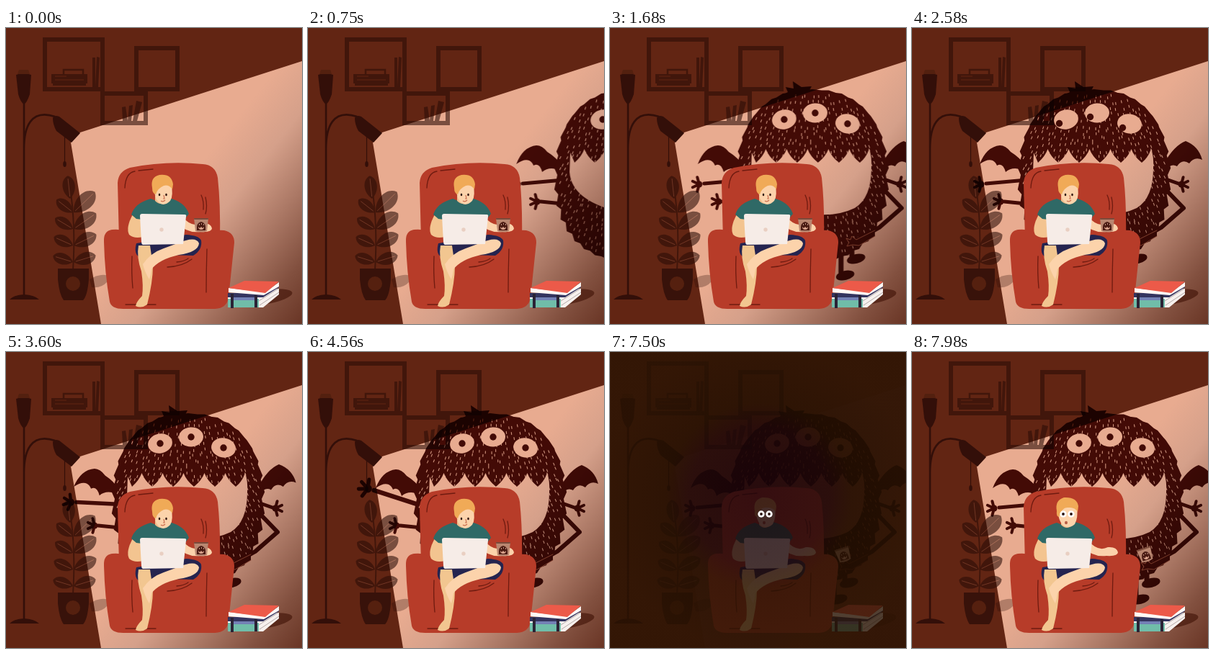
An HTML page that plays this animation: 411 by 411 pixels, repeating every 8000 ms.

```html
<!DOCTYPE html>
<html lang="en">
<head>
<meta charset="utf-8">
<title>Night visitor</title>
<style>
html, body { margin: 0; width: 100%; height: 100%; overflow: hidden; background: #622513; }
svg { display: block; width: 100vw; height: 100vh; }
#monster { mix-blend-mode: multiply; }
</style>
</head>
<body>
<svg viewBox="0 0 411 411" preserveAspectRatio="none">
  <defs>
    <linearGradient id="light" gradientUnits="userSpaceOnUse" x1="257" y1="205" x2="460" y2="366">
      <stop offset="0" stop-color="#e8ab90"/>
      <stop offset=".25" stop-color="#d5a08a"/>
      <stop offset=".5" stop-color="#ac7966"/>
      <stop offset=".75" stop-color="#82503f"/>
      <stop offset="1" stop-color="#643020"/>
    </linearGradient>
    <radialGradient id="gloom" gradientUnits="userSpaceOnUse" cx="207" cy="200" r="215">
      <stop offset="0" stop-color="#17030a"/>
      <stop offset=".45" stop-color="#1d0809"/>
      <stop offset=".6" stop-color="#211002"/>
      <stop offset="1" stop-color="#281303"/>
    </radialGradient>
    <g id="mugArt">
      <path d="M-10-9H10L8 9Q0 12-8 9Z" fill="#b98670"/>
      <path d="M-10-9H10L9.700-7H-9.700Z" fill="#7a4a3b"/>
      <path d="M-6 8Q-7-3 0-4Q7-3 6 8Z" fill="#4a1b13"/>
      <path d="M-4 3L-2 5L0 3L2 5L4 3Q4 7 0 7Q-4 7-4 3Z" fill="#dca48d"/>
      <path d="M-3 0h1M0-1h1M3 0h1" stroke="#e8bba6" stroke-width="1.500"/>
    </g>
  </defs>

  <rect width="411" height="411" fill="#622513"/>
  <path id="beam" d="M103 145L411 46V411H132L90 159Z" fill="url(#light)"/>

  <g opacity=".58" fill="#2a0c06" stroke="#2a0c06" stroke-width="0">
    <path d="M54 16h80v69h-80zM181 28h57v57h-57zM134 91h60v41h-60z" fill="none" stroke-width="6"/>
    <path d="M63 64h50v13h-50zM65 77h46v3h-46z"/>
    <path d="M80 64V58H107V64" fill="none" stroke-width="2.500"/>
    <path d="M68 67h16M68 72h40" stroke="#622513" stroke-width="1"/>
    <path d="M120 41h4v41h-4zM126 40l4 1l-2 41h-4z"/>
    <path d="M161 110l5-1l3 20h-7zM171 108l5-1l-2 22h-5zM181 101l8 2l-7 26h-6z"/>
    <g id="plant"></g>
    <path d="M116 349Q132 340 141 344V352Q132 362 119 360Z" opacity=".5"/>
  </g>
  <path d="M72 334H115V349Q113 372 107 378H80Q74 370 72 349Z" fill="#38120a"/>
  <circle cx="93" cy="355" r="10" fill="#55200f"/>

  <g id="lamp" fill="#330f09" stroke="#330f09">
    <path d="M14 65Q24 61 35 65L33 92Q29 104 25 106Q20 103 17 92Z" stroke="none"/>
    <path d="M16 64L18 58H31L33 64Z" fill="#53200f" stroke="none"/>
    <path d="M25 100V374M25 168C25 138 34 112 68 123" fill="none" stroke-width="2.600"/>
    <path d="M5 377Q10 371 25 370Q40 371 46 377Z" stroke="none"/>
    <path d="M65 125Q67 120 74 123L103 146L91 159L70 143Q65 134 65 125Z" stroke="none"/>
    <path id="cord" fill="none" stroke-width="1.200"/>
    <ellipse id="knob" cx="81.500" rx="2.300" ry="4" stroke="none"/>
  </g>

  <g id="monster"></g>

  <ellipse cx="357" cy="374" rx="41" ry="10" transform="rotate(-9 357 374)" fill="#431409" opacity=".65"/>

  <g id="chair">
    <path d="M157 295L155 215Q156 199 172 194Q222 184 273 189Q291 190 294 208Q298 245 297 295Z" fill="#b73c29"/>
    <path d="M136 297Q135 282 147 280Q165 278 170 288H285Q288 279 303 281Q317 284 317 298L309 374Q307 389 290 390H163Q146 390 144 380Q137 340 136 297Z" fill="#b73c29"/>
    <path d="M165 222Q166 201 179 199M184 198L204 196M271 232Q275 240 274 252M277 235Q280 248 277 258M175 317Q174 340 176 361M279 307Q278 338 278 367M166 384H208M224 332Q245 331 258 321M237 325Q248 324 253 320"
      fill="none" stroke="#6f1b10" stroke-width="1.300" stroke-linecap="round"/>
  </g>

  <g id="man">
    <path d="M176 259Q166 277 171 287Q178 293 190 290L191 262Z" fill="#f3c490"/>
    <path d="M245 262Q258 278 272 271Q284 270 286 278Q286 284 270 283Q250 285 240 272Z" fill="#fbd2ab"/>
    <path d="M181 299Q177 313 185 318Q200 322 222 315L260 316Q273 308 271 295Q268 288 250 287Z" fill="#25244f"/>
    <path d="M184 302Q181 318 188 338Q191 358 189 372Q181 380 180 386Q188 390 196 384Q204 352 204 330L200 302Z" fill="#f2c690"/>
    <path d="M238 299Q264 288 268 299Q267 311 240 315Q213 321 202 335Q201 343 199 349Q193 340 190 328Q201 312 219 306Z" fill="#fcd3ab"/>
    <path d="M174 259Q179 243 201 237L211 241L226 236Q248 241 254 258L246 268Q214 270 181 265Z" fill="#2f6966"/>
    <path d="M207 233H223V240Q215 248 207 240Z" fill="#f0bd8c"/>
    <g id="calm">
      <path d="M205 218L229 216Q233 232 228 240Q220 248 213 243Q206 237 205 218Z" fill="#fcd3ab"/>
      <path d="M203 222Q200 207 213 204Q230 202 232 217L231 224Q226 217 219 219Q210 223 208 231Q203 230 203 222Z" fill="#f0aa57"/>
      <path d="M213 231v1M222.500 231v1" stroke="#32150f" stroke-width="2.400" stroke-linecap="round"/>
      <path d="M219 232l1 5h-2M215 240q3 2 6-1" fill="none" stroke="#cb6f50" stroke-width="1.200"/>
    </g>
    <g id="scared">
      <path d="M202 215H229Q231 230 226 239Q220 245 212 242Q203 238 202 215Z" fill="#fcd3ab"/>
      <path d="M201 221Q198 206 211 202Q229 201 231 214L230 222Q226 215 217 216Q208 215 204 229Q200 228 201 221Z" fill="#f0aa57"/>
      <ellipse cx="214" cy="237" rx="2" ry="2.300" fill="#b75e45"/>
    </g>
    <path d="M186 261Q186 258 189 258L248 259Q251 259 250 262L246 300L190 301Q188 300 188 297Z" fill="#f6ece7"/>
    <circle cx="216" cy="280" r="2.700" fill="#e9cfc2"/>
  </g>
  <use id="mug" href="#mugArt"/>

  <g id="books">
    <path d="M308 373L330 364L379 362V370L357 388H308Z" fill="#f7f1ee"/>
    <path d="M308 376H351V388H308Z" fill="#70bda9"/>
    <path d="M308 368H357L379 356V360L357 374H308Z" fill="#34345f"/>
    <path d="M314 374H349L348 378H314Z" fill="#7380b5"/>
    <path d="M309 361L360 367L379 353V359L358 371L309 367Z" fill="#fff8f5"/>
    <path d="M309 361L331 351L379 352L360 368Z" fill="#ec5a49"/>
    <path d="M312 369h4v20h-4zM345 371h4v17h-4z" fill="#2b2335"/>
    <path d="M351 379L378 362M352 385L379 367" stroke="#b5aaa8" stroke-width="1"/>
  </g>

  <rect id="dark" width="411" height="411" fill="url(#gloom)"/>
  <g id="stare"></g>
</svg>
<script>
const LOOP = 8000, INK = '#490f0a';
const $ = id => document.getElementById(id);
const clamp = v => Math.max(0, Math.min(1, v));
const ramp = (t, a, b) => clamp((t - a) / (b - a));
const smooth = (t, a, b) => { const u = ramp(t, a, b); return u * u * (3 - 2 * u); };
const set = (el, attrs) => { for (const k in attrs) el.setAttribute(k, attrs[k]); };
const show = (el, on) => set(el, { visibility: on ? 'visible' : 'hidden' });

let seed = 7;
const rnd = () => (seed = seed * 16807 % 2147483647) / 2147483647;

// Plant
const leaf = (x, y, turn, len) => {
  const w = len * .36, a = -len * .3, b = -len * .85;
  return `<g transform="translate(${x} ${y}) rotate(${turn})">
    <path d="M0 0C${-w} ${a} ${-w} ${b} 0 ${-len}C${w} ${b} ${w} ${a} 0 0Z"/>
    <path d="M0-3V${4 - len}" stroke="#8a4b38" stroke-width=".8"/></g>`;
};
let leaves = '<path d="M93 336Q97 275 89 222" fill="none" stroke-width="2"/>' + leaf(89, 237, -6, 32);
for (let i = 0; i < 4; i++) {
  const y = 256 + i * 23;
  leaves += leaf(93, y, -52 - i * 7, 29) + leaf(94, y, 46 + i * 9, 41 - i * 3);
}
$('plant').innerHTML = leaves;

// Monster, drawn where it comes to rest
const bend = v => Math.sign(v) * Math.abs(v) ** .85;

function furPath() {
  let d = '';
  const n = 72;
  for (let i = 0; i < n; i++) {
    const a = i / n * Math.PI * 2, c = Math.cos(a);
    const tuft = i % 2 ? .01 + .035 * c * c : 0;
    const x = 253 + 102 * (1 + tuft) * bend(c);
    const y = 204 + 119 * bend(Math.sin(a)) + tuft * 120;
    d += (i ? 'L' : 'M') + x.toFixed(1) + ' ' + y.toFixed(1);
  }
  return d + 'Z';
}

function specks() {
  let d = '';
  for (let y = 90; y < 318; y += 8.5)
    for (let x = 154; x < 352; x += 8) {
      const px = x + rnd() * 6, py = y + rnd() * 6;
      const u = (px - 253) / 99, v = (py - 204) / 115;
      if (Math.abs(u) ** 2.3 + Math.abs(v) ** 2.3 > 1) continue;
      d += `M${px.toFixed(1)} ${py.toFixed(1)}l${(u * 1.5).toFixed(1)} 3`;
    }
  return d;
}

function mouthPath() {
  let d = 'M168 200L169 173L175 187';
  for (let x = 174; x < 319; x += 29)
    d += `Q${x + 11} 178 ${x + 14.5} 168Q${x + 18} 178 ${x + 29} 187`;
  return d + 'Q328 180 332 168Q336 178 335 195Q335 236 312 250Q283 264 245 257Q171 242 168 200Z';
}

const hand = (x, y, turn) => {
  let d = '';
  for (const a of [-75, -25, 25, 75]) {
    const r = (a + turn) * Math.PI / 180;
    d += `M${x} ${y}l${(10 * Math.cos(r)).toFixed(1)} ${(10 * Math.sin(r)).toFixed(1)}`;
  }
  return `<path d="${d}" stroke-width="4"/><circle cx="${x}" cy="${y}" r="4.5" stroke="none"/>`;
};

const EYES = [[214, 127, -12], [257, 118, -4], [302, 133, 10]];
const LEGS = [[226, 306, 42], [262, 308, 38], [293, 305, 40], [308, 292, 30]];

$('monster').innerHTML = `<g fill="${INK}" stroke="${INK}" stroke-width="5" stroke-linecap="round" stroke-linejoin="round">
  <g id="wingL"><path stroke="none" d="M156 190Q150 180 137 172Q130 163 122 163Q103 165 94 189Q105 181 112 184Q116 186 118 191Q126 186 130 200Q140 191 156 198Z"/></g>
  <g id="wingR"><path stroke="none" d="M350 188Q364 163 380 157Q398 164 403 183Q392 178 385 188Q375 181 368 192Q360 187 351 198Z"/></g>
  ${LEGS.map(([, , len]) => `<g class="leg"><path d="M0-10V${len - 5}" stroke-width="7"/><ellipse cx="6" cy="${len}" rx="13" ry="6.500" transform="rotate(-14 0 ${len})" stroke="none"/></g>`).join('')}
  <g id="reach"><path d="M4 0L-52 5"/>${hand(-59, 6, 180)}</g>
  <path d="M158 244L128 241"/>${hand(123, 241, 180)}
  <path d="M350 209L370 216"/>${hand(374, 217, 0)}
  <path stroke="none" d="${furPath()}"/>
  <path stroke="none" d="M206 96L219 89L216 82L227 84L226 74L238 82L252 81L249 87L266 92Z"/>
  <path d="${specks()}" fill="none" stroke="#fff" stroke-width="1.100" opacity=".85"/>
  <path d="${mouthPath()}" fill="#fff" stroke="none"/>
  <path d="M350 222L377 250L346 277L312 296" fill="none" stroke-width="6"/>
  <path d="M340 281L314 294L308 289L306 294L300 292L304 298L301 303L309 301L318 302L340 289" stroke="#b9826f" stroke-width=".9"/>
  ${EYES.map(([x, y, a]) => `<g transform="translate(${x} ${y})">
    <g transform="rotate(${a})"><ellipse class="eye" rx="17" ry="13.500" fill="#fff" stroke="none"/></g>
    <circle class="pupil" r="4.700" stroke="none"/></g>`).join('')}
</g>`;

$('stare').innerHTML = [210, 221].map(x =>
  `<g class="wide" data-x="${x}"><circle r="4.700" fill="#fff"/><circle class="dot" r="1.900" fill="#28100b"/></g>`).join('');

const all = c => [...document.querySelectorAll('.' + c)];
const legs = all('leg'), eyes = all('eye'), pupils = all('pupil'), wide = all('wide'), dots = all('dot');

function monsterX(t) {
  if (t >= 4710) return 18;
  return t < 1680 ? 28 + .18 * (1680 - t) : 28 * (1 - ramp(t, 1680, 2300)) ** 4;
}

function draw(t) {
  const after = t >= 4710;
  const dark = t < 7500 ? ramp(t, 4570, 4710) : 1 - (.06 + .94 * smooth(t, 7470, 7970));

  set($('beam'), { opacity: 1 - dark });
  set($('dark'), { opacity: .87 * dark });
  set($('monster'), { transform: `translate(${monsterX(t).toFixed(2)} 0)` });

  // Walk
  const step = 1 - smooth(t, 1500, 2100);
  legs.forEach((el, i) => {
    const [x, y] = LEGS[i];
    const swing = 16 * step * Math.sin((t - 1680) / 105 + i * Math.PI);
    set(el, { transform: `translate(${x} ${y}) rotate(${swing.toFixed(2)})` });
  });

  // Eyes
  const look = smooth(t, 2430, 2570) - smooth(t, 3020, 3240);
  pupils.forEach((el, i) => {
    const blink = i ? 1 : Math.max(.07, smooth(Math.abs(t - 1200), 40, 150));
    set(eyes[i], { transform: `scale(1 ${blink.toFixed(3)})` });
    set(el, { cx: -9.5 * look, cy: 5.5 * look, opacity: blink > .3 ? 1 : 0 });
  });

  // Reach for the cord and pull it
  const reach = after ? 0 : smooth(t, 3270, 4110);
  const pull = after ? 0 : 5 * Math.sin(Math.PI * ramp(t, 4150, 4590));
  set($('reach'), { transform: `translate(155 ${211 + pull}) rotate(${23 * reach}) scale(${1 + .27 * reach})` });
  set($('cord'), { d: `M81.500 150V${186 + pull}` });
  set($('knob'), { cy: 189 + pull });

  const flap = 4 * Math.sin(Math.PI * 2 * ramp(t, 3270, 4050));
  set($('wingL'), { transform: `rotate(${flap} 154 192)` });
  set($('wingR'), { transform: `rotate(${-flap} 352 192)` });

  // Reader
  show($('calm'), !after);
  show($('scared'), after);
  set($('mug'), { transform: after ? 'translate(324 281) rotate(-18)' : 'translate(271 273)' });
  const open = smooth(t, 5200, 5370);
  const glance = -smooth(t, 6040, 6180) + 2 * smooth(t, 6270, 6440) - smooth(t, 6540, 6690);
  show($('stare'), t >= 5220);
  wide.forEach((el, i) => {
    set(el, { transform: `translate(${el.dataset.x} 225) scale(1 ${open.toFixed(3)})` });
    set(dots[i], { cx: 2 * glance });
  });
}

const start = performance.now();
function tick() {
  draw((performance.now() - start) % LOOP);
  requestAnimationFrame(tick);
}
draw(0);
requestAnimationFrame(tick);
</script>
</body>
</html>
```
